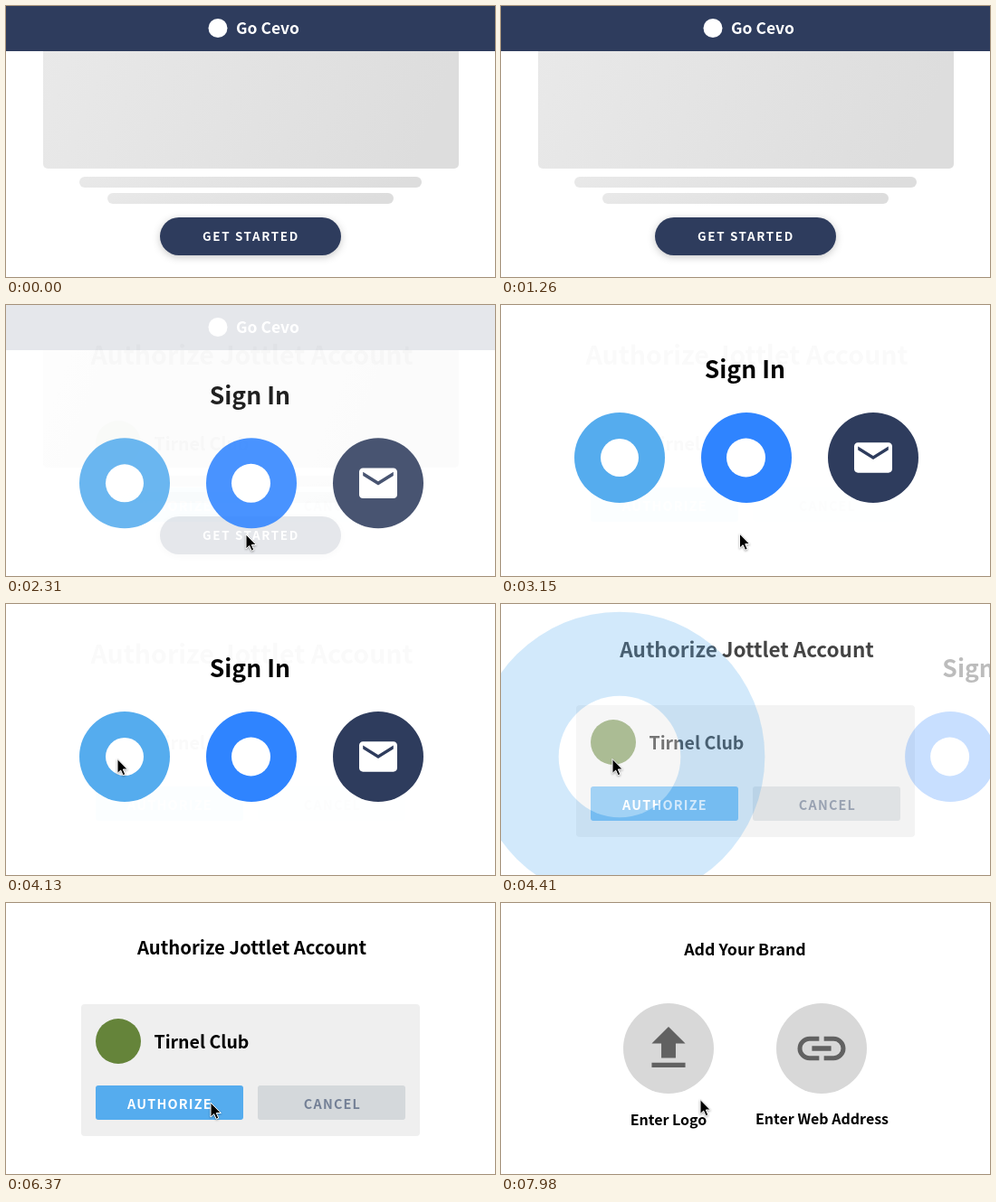
Recreate the animation shown at these times as an HTML page. Size 540x300 px, loop 8 s.

```html
<!DOCTYPE html>
<html lang="en">
<head>
<meta charset="utf-8">
<title>Sign-in flow</title>
<style>
  html, body { margin: 0; width: 100%; height: 100%; overflow: hidden; background: #fff; }
  svg { display: block; width: 100vw; height: 100vh; }
  text { font: bold 16px "Noto Sans CJK JP", "Noto Sans CJK SC", "Noto Sans CJK", "Open Sans", sans-serif; }
  .mid { text-anchor: middle; }
  .label { font-size: 14.4px; letter-spacing: 1.2px; }
  .shadow { filter: drop-shadow(0 2px 4px rgba(0, 0, 0, .22)); }
</style>
</head>
<body>
<svg viewBox="0 0 540 300">
  <defs>
    <linearGradient id="grey" x1="0" y1="0" x2="1" y2=".12">
      <stop offset="0" stop-color="#e9e9e9"/>
      <stop offset="1" stop-color="#dddddd"/>
    </linearGradient>
  </defs>

  <g id="welcome">
    <rect x="41" y="30" width="459" height="150" rx="5" fill="url(#grey)"/>
    <rect x="81" y="189" width="378" height="12" rx="6" fill="url(#grey)"/>
    <rect x="112" y="207" width="316" height="12" rx="6" fill="url(#grey)"/>
    <rect width="540" height="50" fill="#2e3c5d"/>
    <circle cx="234" cy="24.5" r="10.5" fill="#fff"/>
    <text x="254" y="31.3" fill="#fff" style="font-size:17.5px">Go Cevo</text>
    <rect class="shadow" x="170" y="234" width="200" height="42" rx="21" fill="#2e3c5d"/>
    <text class="mid" x="270.5" y="260.3" fill="#fff" style="font-size:13.4px;letter-spacing:1.65px">GET STARTED</text>
  </g>

  <g id="account">
    <g id="accountTitle"><text class="mid" y="7.6" style="font-size:20.3px">Authorize Jottlet Account</text></g>
    <rect x="83" y="112" width="374" height="146" rx="4" fill="#efefef"/>
    <circle cx="124" cy="153" r="25" fill="#65843a"/>
    <text x="163.5" y="161.3" style="font-size:19.5px">Tirnel Club</text>
    <rect x="99" y="202" width="163" height="38" rx="3" fill="#55acee"/>
    <text class="mid label" x="181" y="228" fill="#fff">AUTHORIZE</text>
    <rect x="278" y="202" width="163" height="38" rx="3" fill="#d4d8db"/>
    <text class="mid label" x="360.5" y="228" fill="#748096">CANCEL</text>
  </g>

  <g id="signIn">
    <g id="signInTitle"><text class="mid" x="269.3" y="81.3" style="font-size:26.5px">Sign In</text></g>
    <g id="socialButton">
      <circle r="50" fill="#55acee"/>
      <circle r="21" fill="#fff"/>
    </g>
    <g id="otherButtons">
      <circle cx="271" cy="169" r="50" fill="#2f84ff"/>
      <circle cx="270.5" cy="169" r="21.5" fill="#fff"/>
      <circle cx="411" cy="169" r="50" fill="#2e3c5d"/>
      <path transform="translate(385.8 143.8) scale(2.1)" fill="#fff"
        d="M20 4H4c-1.1 0-2 .9-2 2v12c0 1.1.9 2 2 2h16c1.1 0 2-.9 2-2V6c0-1.1-.9-2-2-2zm0 4l-8 5-8-5V6l8 5 8-5z"/>
    </g>
  </g>

  <g id="brand">
    <text class="mid" x="269.5" y="58.3" style="font-size:17.8px">Add Your Brand</text>
    <g fill="#d8d8d8">
      <circle cx="185" cy="161" r="50"/>
      <circle cx="354" cy="161" r="50"/>
    </g>
    <g fill="#616161">
      <path transform="translate(153.2 129) scale(2.65)" d="M9 16h6v-6h4l-7-7-7 7h4zm-4 2h14v2H5z"/>
      <path transform="translate(322.2 129.2) scale(2.65)"
        d="M3.9 12c0-1.7 1.4-3.1 3.1-3.1h4V7H7a5 5 0 0 0 0 10h4v-1.9H7c-1.7 0-3.1-1.4-3.1-3.1zM8 13h8v-2H8zm9-6h-4v1.9h4a3.1 3.1 0 0 1 0 6.2h-4V17h4a5 5 0 0 0 0-10z"/>
    </g>
    <text class="mid" x="185" y="246.2">Enter Logo</text>
    <text class="mid" x="354.5" y="245.2">Enter Web Address</text>
  </g>

  <path id="cursor" d="M0 0V16l3.7-3.4 2.5 5.6 2.6-1.1-2.5-5.6h5z" stroke="#fff" stroke-width="1"
    style="filter:drop-shadow(0 1px 1px rgba(0,0,0,.35))"/>
</svg>

<script>
const LOOP = 8000, STEP = 70, FADE = 300, RISE = 228;
const el = id => document.getElementById(id);
const mix = (a, b, s) => a + (b - a) * s;
const progress = (t, start, end) => Math.min(1, Math.max(0, (t - start) / (end - start)));
const sine = u => (1 - Math.cos(Math.PI * u)) / 2;

// cubic-bezier(.25, .1, .25, 1), solved by bisection
function ease(x) {
  if (x <= 0 || x >= 1) return x;
  const curve = (p1, p2, k) => 3 * p1 * k * (1 - k) ** 2 + 3 * p2 * k * k * (1 - k) + k ** 3;
  let low = 0, high = 1;
  for (let i = 0; i < 30; i++) {
    const k = (low + high) / 2;
    if (curve(.25, .25, k) < x) low = k; else high = k;
  }
  return curve(.1, 1, low);
}

function cursorAt(t) {
  if (t < 350 || (t > 1225 && t < 1365)) return [0, -100];
  if (t <= 1225) {
    const u = (t - 350) / 840;
    return [468 - 62 * u ** 3, 86.5 + 210 * (1 - Math.max(0, 1 - u) ** 1.3)];
  }
  if (t < 3080) {
    const u = 1 - (1 - progress(t, 1400, 1960)) ** 2;
    return [mix(344, 265, u), mix(296, 254, u)];
  }
  const first = sine(progress(t, 3080, 4130));
  const second = sine(progress(t, 5320, 6370));
  const third = progress(t, 7700, 7980) ** 2;
  return [
    265 - 142 * first + 103 * second - 6 * third,
    254 - 82.5 * first + 49.5 * second - 3.5 * third
  ];
}

function place(id, x, y, scale = 1) {
  el(id).setAttribute("transform", `translate(${x} ${y}) scale(${scale})`);
}

function draw(t) {
  const toSignIn = ease(progress(t, 2134, 2134 + FADE));
  const toAccount = ease(progress(t, 4278, 4278 + FADE));
  const toBrand = ease(progress(t, 6655, 6655 + FADE));

  // the account screen shows very faintly before its turn
  const faint = toSignIn > 0 ? .02 : 0;
  el("welcome").style.opacity = 1 - toSignIn;
  el("account").style.opacity = Math.max(faint, toAccount) * (1 - toBrand);
  el("brand").style.opacity = toBrand;
  for (const id of ["signInTitle", "socialButton", "otherButtons"])
    el(id).style.opacity = toSignIn * (1 - toAccount);

  place("signIn", 0, RISE * (1 - toSignIn));
  place("signInTitle", 357 * toAccount, 0);
  place("otherButtons", 306 * toAccount, 0);
  place("socialButton", 131, 169, 1 + 3 * toAccount);
  place("accountTitle", 271.5, mix(55, 49.5, toAccount), mix(1.406, 1, toAccount));
  place("brand", 0, RISE * (1 - toBrand));
  place("cursor", ...cursorAt(t));
}

function tick() {
  const t = performance.now() % LOOP;
  draw(Math.floor(t / STEP) * STEP);
  requestAnimationFrame(tick);
}
tick();
</script>
</body>
</html>
```
